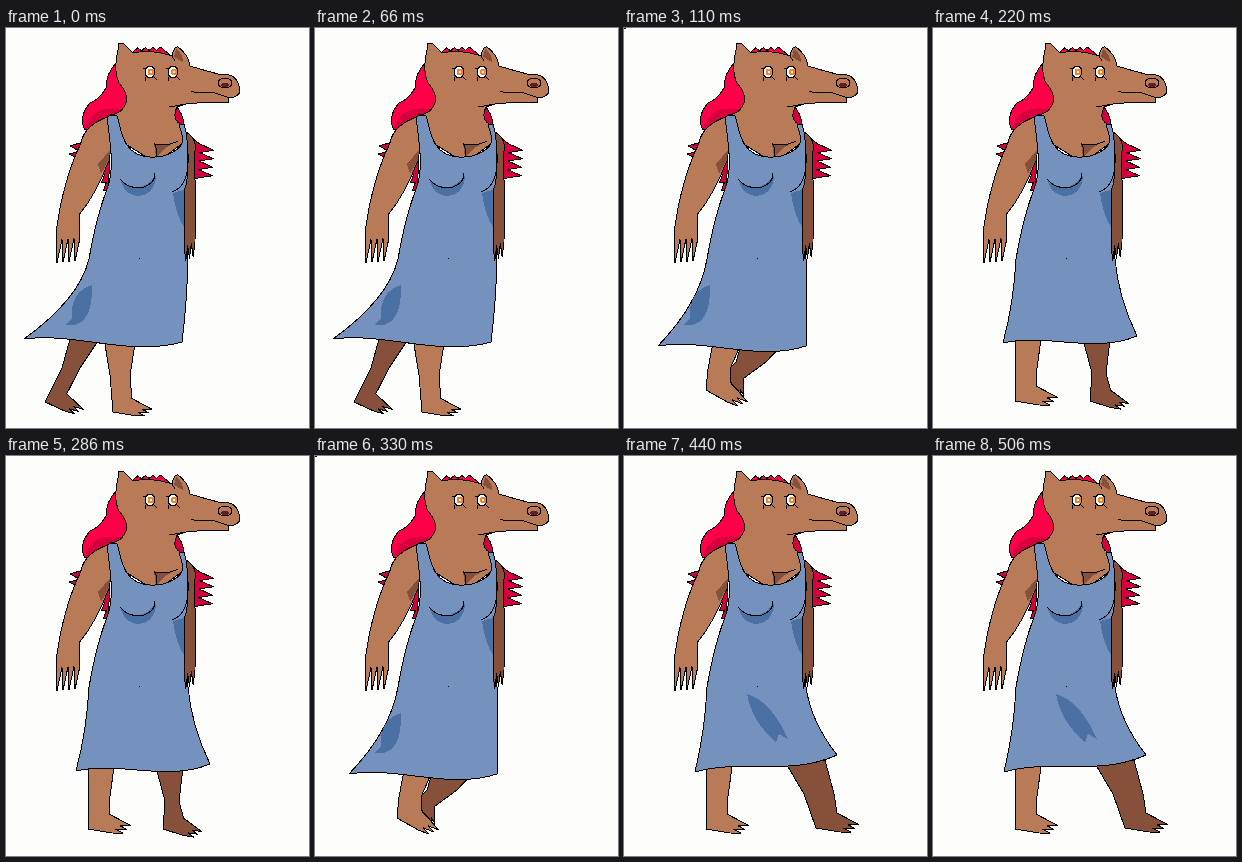
An HTML page for the animation above (550 ms loop, 303 by 400 pixels).

```html
<!DOCTYPE html>
<html lang="en">
<meta charset="utf-8">
<title>Walk cycle</title>
<style>
html, body { margin: 0; width: 100%; height: 100%; overflow: hidden; background: #fdfefc; }
svg { display: block; width: 100%; height: 100%; shape-rendering: crispEdges; }
path { stroke: #000; stroke-linejoin: round; fill: none; }
.skin { fill: #b97a57; }
.shade { fill: #86503a; }
.hair { fill: #ff0048; }
.darkHair { fill: #d5003d; }
.dress { fill: #7591be; }
.fold { fill: #4a70a4; }
.nostril { fill: #641d25; }
.white { fill: #fff; }
.iris { stroke: #ef832e; stroke-width: 2.5; }
.flat { stroke: none; }
</style>
<svg viewBox="0 0 303 400"></svg>
<script>
const FRAME_MS = 110;
const svg = document.querySelector("svg");

function part(className, d = "") {
  const path = document.createElementNS("http://www.w3.org/2000/svg", "path");
  path.setAttribute("class", className);
  path.setAttribute("d", d);
  return svg.appendChild(path);
}

// Pointed tips along the line from (x1, y1) to (x2, y2), each pushed out by (dx, dy).
function spikes(x1, y1, x2, y2, count, dx, dy) {
  const at = t => [x1 + (x2 - x1) * t, y1 + (y2 - y1) * t];
  let d = `L${x1} ${y1}`;
  for (let i = 0; i < count; i++) {
    const [x, y] = at((i + 0.5) / count);
    d += `L${x + dx} ${y + dy}L${at((i + 1) / count)}`;
  }
  return d;
}

function ellipse(x, y, rx, ry = rx) {
  return `M${x - rx} ${y}a${rx} ${ry} 0 1 0 ${2 * rx} 0a${rx} ${ry} 0 1 0 ${-2 * rx} 0Z`;
}

// The foot is laid out from the heel, then scaled and tilted about it.
function leg({ hips, knee: [kx, ky, half], heel: [hx, hy], tilt = 0, size = 1 }) {
  const cos = size * Math.cos(tilt * Math.PI / 180);
  const sin = size * Math.sin(tilt * Math.PI / 180);
  const foot = `M0 0L21 -15${spikes(36, -7, 24, 4, 3, 9, 2)}Z`
    .replace(/M0 0/, "").replace("Z", "L0 0")
    .replace(/(-?[\d.]+)[ ,](-?[\d.]+)/g, (_, x, y) =>
      `${hx + x * cos - y * sin} ${hy + x * sin + y * cos}`);
  return `M${hips[0]} 304L${kx - half} ${ky}L${hx} ${hy}`
    + foot.split("L").slice(1).reverse().map(p => "L" + p).join("")
    + `L${kx + half} ${ky}L${hips[1]} 304Z`;
}

// Skirt sides bend towards the waist; the hem is one shallow wave.
function skirt([lx, ly], [rx, ry]) {
  const waistY = 231, bend = 0.15;
  const side = (waist, x, y) => `${waist + (x - waist) * bend} ${(waistY + y) / 2}`;
  const hem = (t, lift) => `${rx + (lx - rx) * t} ${ry + (ly - ry) * t + lift}`;
  return `L182 ${waistY}Q${side(182, rx, ry)} ${rx} ${ry}`
    + `C${hem(0.33, 16)} ${hem(0.67, -8)} ${lx} ${ly}`
    + `Q${side(83, lx, ly)} 83 ${waistY}`;
}

const bodice = "M101 90L104 87 111 88C115 96 114 128 144 129C160 130 177 122 177 110L173 96 178 96 182 112C183 125 184 150 178 163V200";
const bodiceLeft = "C88 203 92 185 100 164C108 145 106 125 101 90Z";
const sideFold = "M86 257Q64 264 66 290L60 297Q87 301 86 257Z";
const frontFold = "M123 238Q147 245 164 283L155 278 152 286Q128 266 123 238Z";
const plantedLeg = { hips: [82, 109], knee: [93, 340, 11], heel: [82, 373] };

const poses = {
  back: {
    far: { hips: [66, 98], knee: [65, 340, 9], heel: [39, 374], tilt: 15, size: 0.9 },
    near: { hips: [97, 131], knee: [114, 347, 10], heel: [107, 384], size: 0.9 },
    left: [18, 311], right: [176, 314], fold: sideFold
  },
  passing: {
    far: { hips: [121, 170], knee: [127, 334, 15], heel: [103, 343], tilt: 60, size: 0.7 },
    near: { hips: [91, 122], knee: [95, 341, 11], heel: [82, 362], tilt: 20 },
    left: [34, 318], right: [182, 318], fold: sideFold
  },
  contact: {
    far: { hips: [148, 178], knee: [166, 345, 7], heel: [157, 373], tilt: 8, size: 0.9 },
    near: plantedLeg,
    left: [70, 315], right: [204, 308], fold: ""
  },
  forward: {
    far: { hips: [160, 201], knee: [195, 338, 15], heel: [192, 372] },
    near: plantedLeg,
    left: [71, 316], right: [213, 299], fold: frontFold
  }
};
const walk = ["back", "passing", "contact", "passing", "forward"];

// Hair
part("hair", `M124 28${spikes(128, 23, 158, 22, 4, 0, -3)}L168 30Z`);
part("hair", "M111 34Q100 45 100 60Q94 71 84 75Q72 89 79 102L112 90 124 70Z");
part("darkHair flat", "M79 101Q85 77 114 81L110 90Z");
part("darkHair", `M78 114${spikes(74, 115, 73, 131, 2, -10, -1)}Z`);
part("darkHair", `M104 130${spikes(97, 138, 102, 163, 3, -4, 4)}Z`);
part("darkHair", "M170 78Q177 86 178 96L166 97Z");
part("darkHair", `M183 108${spikes(194, 116, 192, 150, 4, 14, 2)}L183 150Z`);

// Body
const farLeg = part("shade");
const nearLeg = part("skin");
part("skin", `M104 88Q78 97 75 115Q56 155 50 206${spikes(50, 212, 74, 210, 4, -2, 23)}L73 187Q91 165 103 132L108 100Z`);
part("shade flat", "M104 122L92 136 95 146 103 132Z");
part("skin", "M117 15L127 25Q145 21 166 28Q168 18 172 19Q182 26 184 38Q200 43 216 47Q231 44 234 62Q234 69 223 70L222 75Q208 73 180 76L171 79Q165 92 176 97L181 112 150 135 110 110 104 87Q117 86 121 72Q121 64 113 55Q107 43 112 22L113 15Z");
part("shade flat", "M170 21Q177 26 177 34L168 29ZM148 116Q158 120 172 113Q160 118 150 129Z");
part("", "M148 115Q152 121 150 129M148 116Q160 119 172 113M185 63Q190 66 206 64L224 70M180 76L163 79M166 28L169 33");

// Face
part("", ellipse(219, 55, 7, 5));
part("nostril flat", ellipse(219, 57, 4, 2.5));
for (const x of [144, 167]) {
  part("white", ellipse(x, 44, 5, 6));
  part("iris", ellipse(x + 1, 44, 2.2));
  part("", `M${x - 7} 40l3 1M${x - 4} 49l-1 4M${x + 4} 49l3 3`);
}

// Dress, with the far arm hanging in front of its edge
const dress = part("dress");
part("fold flat", "M114 151Q119 168 133 168Q149 166 150 147Q133 170 114 151ZM167 165L178 162V199Q170 187 167 165Z");
part("", "M114 151Q121 160 134 160Q149 157 149 145M133 230h1");
part("shade", `M180 104Q191 110 189 123Q188 148 190 165L189 212${spikes(189, 214, 178, 219, 3, 0, 14)}V163Q184 150 181 112Z`);
part("", "M182 125Q184 158 166 164");
const fold = part("fold flat");
const speck = part("flat", "M0 0h2v1h-2z");
speck.style.fill = "#000";

function draw(time) {
  const name = walk[Math.floor(time / FRAME_MS) % walk.length];
  const pose = poses[name];
  farLeg.setAttribute("d", leg(pose.far));
  nearLeg.setAttribute("d", leg(pose.near));
  dress.setAttribute("d", bodice + skirt(pose.left, pose.right) + bodiceLeft);
  fold.setAttribute("d", pose.fold);
  speck.style.display = name === "passing" ? "" : "none";
}

const start = performance.now();
function tick() {
  draw(performance.now() - start);
  requestAnimationFrame(tick);
}
tick();
</script>
</html>
```
